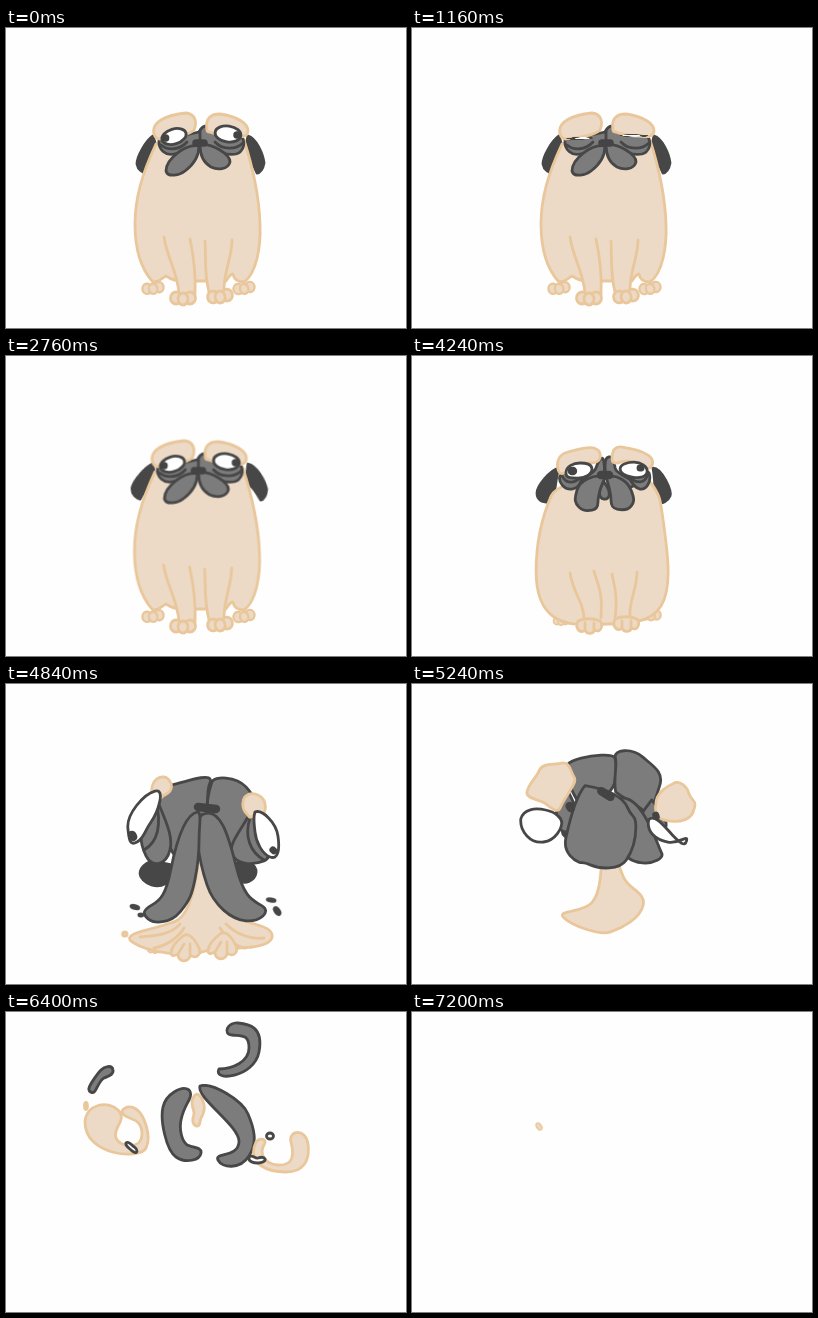
Animation, 400 px wide and 300 px high, one loop 7280 ms. Source, as an HTML page without scripts:

```html
<!DOCTYPE html>
<html lang="en">
<head>
<meta charset="utf-8">
<title>Melting pug</title>
<style>
html, body { margin: 0; height: 100%; overflow: hidden; background: #fefefe }
svg { display: block; width: 100vw; height: 100vh }
svg * { animation: 7.28s linear infinite }
g, path, ellipse { stroke-linecap: round; stroke-linejoin: round; stroke-width: 2.8 }
.skin { fill: #ecdac7; stroke: #e9c79b }
.gray { fill: #7c7c7c; stroke: #474747 }
.dark { fill: #474747; stroke: #474747 }
.white { fill: #fff; stroke: #474747 }
.line { fill: none }
.dot { fill: none; stroke: #444; stroke-width: 8.5 }

/* Sitting pug */
#pug { animation-name: leave; animation-timing-function: step-end }
#pug .dot { stroke-width: 7.5 }
#body { animation-name: lean; transform-origin: 192px 258px }
#head { animation-name: shake }
.ear { animation-name: flap }
.blink { animation-name: blink; transform-box: fill-box; transform-origin: 50% 60% }
@keyframes leave { 0% { opacity: 1 } 58.24%, to { opacity: 0 } }
@keyframes blink { 0%, 13.18%, 17.58%, to { transform: none } 14.8%, 15.9% { transform: scaleY(.12) } }
@keyframes lean {
  0%, 31.31%, 38.46%, to { transform: none }
  31.32% { transform: skewX(1.2deg) scaleX(1.01) }
  33.5%, 35.7% { transform: skewX(-1.5deg) }
  34.6%, 36.8% { transform: skewX(1.5deg) }
}
@keyframes shake {
  0%, 31.31%, 38.46%, to { transform: none }
  31.32% { transform: translate(-3.5px, -4px) }
  33.5%, 35.7% { transform: translate(5px, -1px) }
  34.6%, 36.8% { transform: translate(-5px, -1px) }
}
@keyframes flap {
  0%, 31.31%, 38.46%, to { transform: none }
  31.32% { transform: translate(-3px, -4px) }
  33.5%, 35.7% { transform: rotate(calc(var(--turn) * .4)) }
  34.6%, 36.8% { transform: rotate(var(--turn)) }
}

/* Melting parts: --a droop, --b puddle, --c burst, --d hooks */
#melt { animation-name: enter; animation-timing-function: step-end }
#melt path { animation-name: morph, vanish; transform-box: fill-box; transform-origin: var(--at, 50% 50%) }
#melt .gone { animation-name: morph, gone }
#melt .early { animation-name: morph, early }
#melt use { animation-name: early }
@keyframes enter { 0% { opacity: 0 } 58.24%, to { opacity: 1 } }
@keyframes morph {
  0%, 58.24% { d: var(--a) }
  66.48% { d: var(--b) }
  76.92% { d: var(--c, var(--b)) }
  87.91%, to { d: var(--d, var(--c, var(--b))) }
}
@keyframes vanish {
  0%, 89% { transform: none; visibility: visible }
  98.4% { transform: scale(.08); visibility: visible }
  98.5%, to { transform: scale(0); visibility: hidden }
}
@keyframes gone { 0%, 78% { visibility: visible } 78.1%, to { visibility: hidden } }
@keyframes early { 0%, 69% { visibility: visible } 69.1%, to { visibility: hidden } }
.foot {
  --a: path("M166 265C162 274 170 278 173 274C175 279 182 278 182 274C190 278 191 268 188 265C182 262 172 262 166 265ZM173 274V267M182 274V267");
  --b: path("M177 252C162 264 162 276 172 270C172 280 184 278 184 271C190 276 197 270 192 262C188 254 182 248 177 252ZM172 270L178 260M184 271L184 260");
}

/* Flying drops */
.splash { animation-name: splash }
.burst { animation-name: burst }
.hook { animation-name: hook }
#last { animation-name: last; transform-box: fill-box; transform-origin: center }
@keyframes splash {
  0%, 62.9% { opacity: 0 }
  63% { opacity: 1; transform: translate(calc(var(--x) * -.6), 8px) }
  66.48% { opacity: 1; transform: none }
  68.6% { opacity: 1; transform: translate(var(--x), 3px) }
  68.7%, to { opacity: 0 }
}
@keyframes burst {
  0%, 73% { opacity: 0 }
  73.1% { opacity: 1; transform: translate(calc(var(--x) * -1), calc(var(--y) * -1)) }
  76.92% { opacity: 1; transform: none }
  80% { opacity: 1; transform: translate(var(--x), var(--y)) }
  80.1%, to { opacity: 0 }
}
@keyframes hook {
  0%, 84% { opacity: 0 }
  84.1%, 91% { opacity: 1 }
  91.1%, to { opacity: 0 }
}
@keyframes last {
  0%, 95% { opacity: 0; transform: scale(2.2) }
  95.1% { opacity: 1; transform: scale(2.2) }
  98.9%, to { opacity: 1; transform: none }
}
</style>
</head>
<body>
<svg viewBox="0 0 400 300">
<defs>
  <g id="paw">
    <ellipse cx="-7" rx="5.5" ry="6"/>
    <ellipse cx="7" rx="5.5" ry="6"/>
    <ellipse cy="1" rx="5" ry="6"/>
  </g>
</defs>

<g id="pug">
  <path class="ear dark" style="--turn:34deg;transform-origin:148px 108px" d="M147 108C140 113 131 128 131 136C132 142 137 145 141 145C143 138 147 130 152 125Z"/>
  <path class="ear dark" style="--turn:-18deg;transform-origin:243px 108px" d="M242 108C250 110 257 126 258 135C257 141 254 145 251 145C248 138 244 130 238 125Z"/>
  <g class="skin">
    <g id="body">
      <path d="M150 116C136 146 129 170 129 196C129 216 132 238 147 254C154 254 156 250 160 248C166 252 172 253 176 253H220C222 250 224 246 227 246C228 252 232 254 238 254C250 246 255 220 254 196C253 165 247 140 238 112Z"/>
      <path d="M158 209C161 230 172 245 173 266H189C190 245 187 225 184 211M199 213C200 230 198 245 203 264H218C217 245 226 230 226 212"/>
    </g>
    <use href="#paw" transform="translate(147 260) rotate(-8) scale(.85)"/>
    <use href="#paw" transform="translate(238 260) rotate(-10) scale(.85)"/>
    <use href="#paw" transform="translate(177 270)"/>
    <use href="#paw" transform="translate(214 268) rotate(-8)"/>
  </g>
  <g id="head">
    <g class="gray">
      <path d="M153 112C152 122 160 128 168 126C178 124 186 120 194 118C206 122 220 128 230 126C237 124 240 116 236 109L200 98C196 98 194 102 193 104L184 106Z"/>
      <path class="line" d="M155 117C162 123 174 122 181 114M237 115C230 122 216 122 209 114M194 103V114"/>
      <path d="M193 118C180 115 160 131 160 143C162 150 174 147 179 143C187 137 193 128 193 118Z"/>
      <path d="M194 117C206 115 224 126 224 134C222 142 211 142 205 139C198 135 194 127 194 117Z"/>
    </g>
    <path class="dot" d="M190 115H198"/>
    <g class="skin">
      <path d="M148 106C145 94 160 87 180 85C190 86 191 95 188 102C182 108 164 110 154 111C151 111 149 109 148 106Z"/>
      <path d="M201 102C199 91 204 86 214 86C230 88 242 95 242 103C241 110 234 109 228 108C220 108 208 106 204 104C202 104 201 104 201 102Z"/>
    </g>
    <g class="blink">
      <ellipse class="white" cx="168" cy="108.5" rx="12.5" ry="7.5" transform="rotate(-17 168 108.5)"/>
      <path class="dot" d="M159.5 110h.1"/>
    </g>
    <g class="blink">
      <ellipse class="white" cx="222" cy="106" rx="13" ry="8" transform="rotate(8 222 106)"/>
      <path class="dot" d="M231 107h.1"/>
    </g>
  </g>
</g>

<g id="melt">
  <path class="dark gone" style='--a:path("M147 112C138 114 125 130 125 137S130 146 137 146S142 125 147 112Z");--b:path("M152 178C146 174 134 182 134 190S154 210 165 194S164 182 152 178Z");--c:path("M170 100C165 100 165 105 165 110S175 115 180 110S175 100 170 100Z")'/>
  <path class="dark gone" style='--a:path("M241 112C250 112 260 135 258 140S250 148 246 146S244 128 241 112Z");--b:path("M240 174C244 180 251 182 250 189S238 203 232 194S230 176 240 174Z");--c:path("M220 110C225 108 228 112 228 116S222 120 218 118S216 112 220 110Z")'/>
  <g class="skin">
    <use href="#paw" transform="translate(149 265) scale(.6)"/>
    <use href="#paw" transform="translate(239 259) scale(.78)"/>
    <path style='--a:path("M139 140C126 170 124 200 124 215S126 250 142 261S180 268 196 268S238 268 249 250S256 200 252 170S248 140 240 128S150 118 139 140Z");--b:path("M192 180C190 200 184 228 172 236S112 248 126 258S180 274 196 268S262 268 266 254S235 240 222 230S202 205 198 185S192 172 192 180Z");--c:path("M183 138C192 160 194 190 187 203S172 206 175 212S194 232 201 230S198 205 200 192S200 175 202 160S204 145 203 137S190 133 183 138Z");--d:path("M187 86C184 92 188 97 188 101S186 106 187 110S193 117 194 110S196 106 197 102S199 97 198 93S197 87 194 84S189 82 187 86Z")'/>
    <path class="line early" style='--a:path("M158 217C162 240 172 246 172 262M182 215C186 230 191 235 189 262M200 218C202 230 206 238 203 262M225 216C225 235 216 245 218 262");--b:path("M174 240C166 250 150 252 134 253M178 244C172 254 160 262 148 264M214 244C220 254 230 262 238 264M220 240C230 250 245 256 258 254")'/>
    <path class="foot early"/>
    <path class="foot early" transform="translate(37 -2)"/>
  </g>
  <g class="gray">
    <path style='--at:30% 60%;--a:path("M193 122C192 115 193 106 191 103S186 106 184 112S170 122 168 126S176 132 180 129S190 124 193 122Z");--b:path("M201 130C202 110 207 100 204 95S180 98 166 101S147 105 153 125S165 180 175 172S195 140 201 130Z");--c:path("M204 72C206 66 204 57 201 54S182 47 172 50S152 60 157 68S170 76 176 80S200 86 204 72Z");--d:path("M107 58C106 52 98 55 95 58S84 72 83 76S87 82 89 79S94 68 98 66S108 63 107 58Z")'/>
    <path style='--at:90% 45%;--a:path("M194 122C192 112 192 102 197 101S202 106 203 112S218 122 222 126S214 134 208 130S198 124 194 122Z");--b:path("M201 130C200 115 204 104 206 98S230 92 240 103S252 120 243 132S226 170 222 160S208 140 201 130Z");--c:path("M206 88C202 75 207 62 201 52S210 38 222 46S252 60 252 74S250 100 240 97S216 92 206 88Z");--d:path("M213 57C226 57 243 50 243 36S236 24 226 23S222 10 232 11S258 14 253 40S206 70 213 57Z")'/>
    <path class="gone" style='--a:path("M148 120C146 126 152 134 160 133S168 126 172 118S152 114 148 120Z");--b:path("M148 108C156 130 168 150 164 166S146 184 140 172S130 150 148 108Z");--c:path("M160 100C165 105 168 110 166 115S156 122 152 116S156 105 160 100Z")'/>
    <path class="gone" style='--a:path("M237 117C240 126 234 134 228 133S220 126 215 119S235 112 237 117Z");--b:path("M245 128C236 145 222 160 226 170S245 182 258 177S256 150 245 128Z");--c:path("M235 105C230 108 226 112 228 118S240 124 245 118S242 108 235 105Z")'/>
    <path class="line early" style='--a:path("M150 120C154 128 162 128 169 121M236 117C234 128 224 128 218 121");--b:path("M150 116C156 142 152 158 138 166M244 134C238 152 244 168 258 176")'/>
    <path class="early" style='--a:path("M192 126C186 134 186 142 192 143S200 136 192 126Z");--b:path("M196 135C192 140 192 148 196 150S200 140 196 135Z")'/>
    <path style='--at:90% 70%;--a:path("M194 121C204 118 215 124 219 134S222 146 219 150S210 154 205 153S199 149 199 144S197 130 194 121Z");--b:path("M198 130C214 124 222 150 230 182S246 216 256 222S254 238 240 237S208 222 201 201S184 134 198 130Z");--c:path("M215 100C225 100 236 102 244 104S248 118 244 122S230 128 222 127S212 126 210 120S208 102 215 100Z");--d:path("M194 74C206 70 236 88 242 102S252 130 243 144S216 156 212 148S232 146 233 130S190 86 194 74Z")'/>
    <path style='--at:15% 60%;--a:path("M192 121C182 118 168 124 165 134S163 147 167 151S175 155 180 154S186 150 186 146S187 138 188 134S190 129 191 126S193 123 192 121Z");--b:path("M192 128C178 130 170 160 165 185S155 216 146 221S136 230 142 235S164 240 174 228S186 210 189 195S193 170 193 155S196 130 192 128Z");--c:path("M156 78C150 98 146 118 144 126S172 142 186 140S200 130 212 133S246 138 250 130S258 104 255 95S244 102 236 96S200 84 156 78Z");--d:path("M183 78C176 73 160 82 157 95S160 138 170 145S194 148 195 141S184 136 180 132S173 118 175 108S181 92 183 88S185 80 183 78Z")'/>
    <path class="line early" style='--a:path("M193 105L193 118");--b:path("M205 97C200 104 203 112 201 122")'/>
  </g>
  <path class="dot gone" style='--a:path("M189 119L197 119");--b:path("M192 123L210 125");--c:path("M187 93L188 102")'/>
  <g class="skin">
    <path style='--at:75% 45%;--a:path("M146 113C144 104 148 98 156 96S176 90 182 92S189 98 188 102S184 107 178 107S164 108 160 111S154 116 152 117S147 118 146 113Z");--b:path("M146 110C145 104 147 98 151 95S160 92 163 96S166 104 164 107S158 111 156 113S153 116 151 116S149 114 148 113S146 112 146 110Z");--c:path("M87 108C90 96 103 92 106 79S126 72 138 64S152 74 160 80S160 98 158 104S150 116 146 130S128 130 118 124S88 118 87 108Z");--d:path("M79 110C80 92 102 88 112 98S106 116 110 126S136 138 136 122S124 108 118 103S122 92 130 97S146 124 140 136S79 144 79 110Z")'/>
    <path style='--at:65% 85%;--a:path("M200 102C200 94 203 90 210 91S230 95 236 99S242 110 237 112S226 106 218 105S206 108 203 107S200 105 200 102Z");--b:path("M237 118C238 110 246 108 252 111S260 120 259 126S256 131 252 131S247 132 245 133S243 132 241 130S236 124 237 118Z");--c:path("M250 122C250 105 264 98 270 89S288 86 293 95S310 102 310 116S308 134 298 138S274 143 262 141S248 134 250 122Z");--d:path("M250 130C254 125 262 127 258 133S256 152 272 153S288 142 285 130S300 116 302 132S298 160 280 160S240 152 250 130Z")'/>
  </g>
  <g class="white">
    <path style='--a:path("M154 117C154 110 162 107 168 107S180 108 180 113S174 122 166 122S154 122 154 117Z");--b:path("M122 145C120 130 138 110 149 107S152 128 145 138S138 154 131 158S123 156 122 145Z");--c:path("M97 126C104 120 110 136 120 143S148 140 154 140S150 158 132 158S94 140 97 126Z");--d:path("M120 131C122 129 125 132 127 134S131 136 131 139S127 140 125 138S119 134 120 131Z")'/>
    <path style='--a:path("M208 113C208 108 216 106 222 106S236 110 235 116S226 122 220 121S208 118 208 113Z");--b:path("M249 128C256 125 270 138 272 152S272 176 264 173S250 158 249 148S247 134 249 128Z");--c:path("M226 142C232 134 238 148 250 150S274 152 284 142S284 162 262 167S222 160 226 142Z");--d:path("M243 145C246 142 249 147 252 146S258 145 259 147S256 151 252 151S242 150 243 145Z")'/>
  </g>
  <path class="dot gone" style='--a:path("M160 115L161 115");--b:path("M126 151L127 153");--c:path("M186 96L187 98")'/>
  <path class="dot gone" style='stroke-width:7;--a:path("M228 112L229 112");--b:path("M267 166L268 167");--c:path("M223 100L223 102")'/>

  <g class="splash dark" style="--x:-22px">
    <ellipse cx="129" cy="223" rx="4" ry="1.5" transform="rotate(15 129 223)"/>
    <ellipse cx="135" cy="231" rx="2" ry="1"/>
    <ellipse class="skin" cx="119" cy="250" rx="2.2" ry="2.2"/>
  </g>
  <g class="splash dark" style="--x:18px">
    <ellipse cx="265" cy="216" rx="4" ry="1.2" transform="rotate(10 265 216)"/>
    <ellipse cx="271" cy="227" rx="4" ry="2" transform="rotate(55 271 227)"/>
  </g>
  <g class="burst skin" style="--x:8px;--y:-12px">
    <ellipse cx="263" cy="65" rx="2.5" ry="7" transform="rotate(25 263 65)"/>
    <ellipse cx="277" cy="69" rx="3.5" ry="8" transform="rotate(22 277 69)"/>
    <ellipse class="gray" cx="248" cy="49.5" rx="3.5" ry="2" transform="rotate(25 248 49.5)"/>
  </g>
  <g class="burst skin" style="--x:2px;--y:14px">
    <ellipse cx="227" cy="193" rx="1.5" ry="2.5" transform="rotate(25 227 193)"/>
    <ellipse cx="217" cy="224" rx="1.5" ry="1.2"/>
    <ellipse cx="206" cy="247" rx="2" ry="4" transform="rotate(-35 206 247)"/>
  </g>
  <g class="burst white" style="--x:3px;--y:-3px">
    <ellipse cx="286" cy="143" rx="4.5" ry="3.5"/>
    <path style='--b:path("M151 121C154 117 165 121 166 128S160 134 158 129S148 127 151 121Z");--a:var(--b)'/>
  </g>
  <ellipse class="hook skin" cx="80" cy="94" rx="1.5" ry="3.5"/>
  <ellipse class="hook white" cx="264" cy="124" rx="3.5" ry="3"/>
  <ellipse id="last" class="skin" cx="127" cy="114.5" rx="2.3" ry="3.8" style="stroke-width:1.6;rotate:-35deg"/>
</g>
</svg>
</body>
</html>
```
